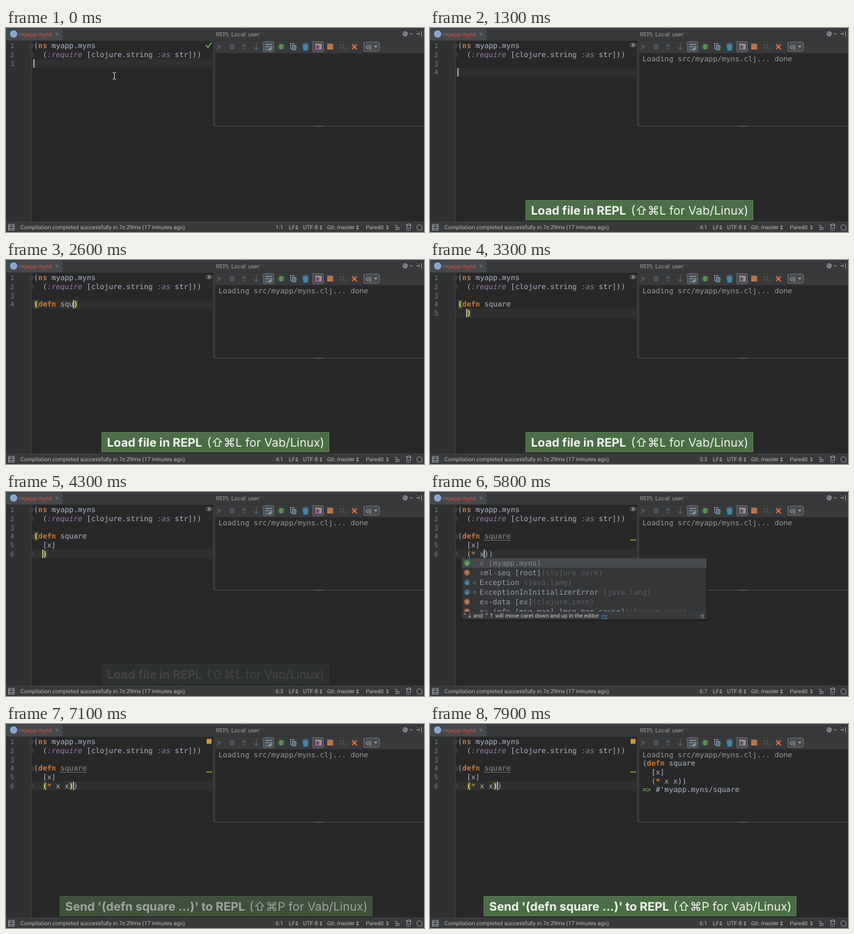
Write an HTML page that moves like this. It is 600x294 px and loops after 8 s.

```html
<!DOCTYPE html>
<html lang="en">
<head>
<meta charset="utf-8">
<title>REPL demo</title>
<style>
  html, body { margin: 0; height: 100%; overflow: hidden; background: #292829; }
  svg { display: block; width: 100vw; height: 100vh; }
  text { white-space: pre; text-rendering: geometricPrecision; }
  .mono { font: 10.5px "DejaVu Sans Mono", monospace; fill: #a9b7c6; }
  .ui { font: 8.15px Roboto, "DejaVu Sans", sans-serif; fill: #bbb; }
  .banner { font: 17px Inter, "DejaVu Sans", sans-serif; fill: #f2f4f1; }
  .keyword { fill: #cc7832; font-weight: bold; }
  .colon { fill: #9876aa; font-style: italic; }
  .unused { fill: #8c8c8c; }
  .bar { fill: #37393b; }
  .line { fill: none; stroke: #8e9194; }
</style>
</head>
<body>
<svg viewBox="0 0 600 294">
  <!-- editor and tab bar -->
  <rect width="600" height="294" fill="#292829"/>
  <rect class="bar" width="600" height="18"/>
  <rect y="1" width="81" height="17" fill="#45494b"/>
  <rect y="18" width="298" height="1" fill="#2f3031"/>
  <circle cx="11" cy="8.5" r="5.2" fill="#8fa9d6"/>
  <text class="ui" x="18.5" y="11.5" style="font-size:8.45px;fill:#c95c4c">myapp.myns</text>
  <path class="line" d="M71 6.5l4 4m0-4l-4 4" stroke-width=".7"/>
  <rect y="19" width="36" height="260" fill="#2e3031"/>
  <path d="M36.5 19V279" stroke="#434547" stroke-width=".7"/>

  <!-- tool window -->
  <rect class="bar" x="297" width="2" height="142"/>
  <rect class="bar" x="299" width="301" height="37"/>
  <path d="M299 17.5H600" stroke="#303234"/>
  <text class="ui" x="301.5" y="11.5" style="font-size:8.4px;fill:#9c9c9c">REPL Local: user</text>
  <g class="line">
    <circle cx="573" cy="8.5" r="2" stroke-width="1.8"/>
    <circle cx="573" cy="8.5" r="3.6" stroke-width="1.3" stroke-dasharray="1.4 1.4"/>
    <path d="M589 8.5h5m-2-2l2 2l-2 2M596.5 4.5v8"/>
  </g>
  <path d="M579.5 7.5h4l-2 2.5z" fill="#8e9194"/>
  <path d="M303.5 22.5l7 4.5l-7 4.5z" fill="#505355"/>
  <circle cx="324.5" cy="27" r="4" fill="#505355"/>
  <path d="M342 32v-9m-3 3.5l3-3.5l3 3.5M359.5 22.5v9m-3-3.5l3 3.5l3-3.5" fill="none" stroke="#55585a" stroke-width="1.5"/>
  <g fill="#484b4d" stroke="#777b7e" stroke-width=".8">
    <rect x="369.5" y="19.5" width="15" height="14.5" rx="1"/>
    <rect x="440.5" y="19.5" width="15" height="14.5" rx="1"/>
    <rect x="513.5" y="20" width="22.5" height="13.5" rx="2"/>
  </g>
  <path d="M372 23.5h10M372 27h9q2 2-1 4h-3m2-2l-2 2l2 1.5M372 31h3" fill="none" stroke="#8fb3cf" stroke-width="1.2"/>
  <ellipse cx="395" cy="27" rx="2.8" ry="4" fill="#57964d"/>
  <path d="M390.5 23l9 8M399.5 23l-9 8M390 27h10" stroke="#57964d"/>
  <g class="line"><rect x="408.5" y="22.5" width="5" height="7"/><rect x="411" y="25" width="5" height="6.5" fill="#47708c"/></g>
  <path d="M426.5 24.5h7l-.7 7.5h-5.6zM425.5 23h9M428.5 22h3" fill="#4585aa" stroke="#4585aa"/>
  <rect x="444" y="22.5" width="9" height="8.5" fill="#a58a9e"/>
  <rect x="445" y="25" width="4.5" height="5" fill="#5a5360"/>
  <rect x="461" y="22.5" width="8.5" height="8.5" fill="#bd7446"/>
  <path class="line" d="M479.5 23.5h5v5h-5zM483 31h5v-4" style="stroke:#505355"/>
  <path d="M497 23.5l6.5 7m0-7l-6.5 7" stroke="#d2703d" stroke-width="1.9"/>
  <text class="ui" x="516.5" y="29.7">clj</text>
  <path d="M528 25.5h5l-2.5 3z" fill="#aaa"/>
  <path d="M299 36.5H600" stroke="#2f3133"/>
  <path d="M299 141.5H600" stroke="#47494b"/>
  <path d="M299.5 37V142" stroke="#3f4143"/>
  <path d="M444 141.5h11" stroke="#888" stroke-dasharray="1.5 1.5"/>

  <g id="live"></g>

  <!-- status bar -->
  <rect class="bar" y="279" width="600" height="15"/>
  <path d="M0 279.5H600" stroke="#404345"/>
  <g class="line"><rect x="3.5" y="283" width="8.5" height="8.5"/><path d="M5.5 283v8M10 283v8M4 285.5h8M4 289h8"/></g>
  <g class="ui">
    <text x="20.5" y="290.4">Compilation completed successfully in 7s 29ms (17 minutes ago)</text>
    <text id="position" x="387" y="290.4"></text>
    <text x="406" y="290.4">LF</text>
    <text x="426.5" y="290.4">UTF-8</text>
    <text x="461" y="290.4">Git: master</text>
    <text x="516.5" y="290.4">Paredit</text>
  </g>
  <path d="M415.5 286.8l2-2.5l2 2.5zm0 1.5h4l-2 2.5zM450 286.8l2-2.5l2 2.5zm0 1.5h4l-2 2.5zM502.5 286.8l2-2.5l2 2.5zm0 1.5h4l-2 2.5zM545.5 286.8l2-2.5l2 2.5zm0 1.5h4l-2 2.5z" fill="#aaa"/>
  <g class="line">
    <path d="M558.5 287v-1.5q0-1.500 1.5-1.5t1.5 1.5v2"/><rect x="560" y="287.5" width="4" height="3"/>
    <path d="M574 284.5h8M575.5 284v-1.5h5v1.5M575.5 285v5l2.5 2l2.5-2v-5M577 288.5h2"/>
    <circle cx="599" cy="287.5" r="4" transform="translate(-5.5)"/><path d="M596 290l2 2"/>
  </g>
</svg>
<script>
const LOOP = 8000, CHAR = 6.321, PITCH = 12.65, LEFT = 40, EDIT_TOP = 29.4, REPL_LEFT = 305, REPL_TOP = 47.6;
const HEADER = "(ns myapp.myns\n  (:require [clojure.string :as str]))\n";
const DEFN = "(defn square\n  [x]\n  (* x x))";
const INSPECTED = 4400;

// [start, interval, keys]; a line break and its indent count as one key
const TYPING = [
  [1200, 110, "\n(defn "], [2200, 140, "square\n  "], [3500, 170, "[x]\n  "],
  [4800, 150, "(* x"], [6000, 200, " x"], [6500, 100, ")"],
];
const POPUPS = [
  { from: 5300, to: 6000, column: 5, hint: "⌃↓ and ⌃↑ will move caret down and up in the editor" },
  { from: 6300, to: 6500, column: 7, hint: "Press ⌃. to choose the selected (or first) suggestion and insert a dot afterwards " },
];
const SUGGESTIONS = [
  ["x", " (myapp.myns)", "#4f8a4b", "s"],
  ["xml-seq [root]", "(clojure.core)", "#a5623f", "f"],
  ["Exception", " (java.lang)", "#356683", "c"],
  ["ExceptionInInitializerError", " (java.lang)", "#356683", "c"],
  ["ex-data [ex]", "(clojure.core)", "#a5623f", "f"],
  ["ex-info [msg map] [msg map cause]", "(clojure.core)", "#a5623f", "f"],
];
const ICONS = {
  check: `<path d="M287 24.5l3 3.5l5-7" fill="none" stroke="#5f9c4e" stroke-width="2"/>`,
  eye: `<ellipse cx="291.5" cy="24.5" rx="4" ry="2.6" class="line"/><circle cx="291.5" cy="24.5" r="1.4" fill="#aaa"/>`,
  pause: `<path d="M290 22v6M293 22v6" stroke="#888" stroke-width="1.3"/>`,
  warning: `<rect x="288" y="21.5" width="7" height="7" fill="#d09a2c"/>`,
};
const ICON_TIMES = [[0, "check"], [1200, "eye"], [INSPECTED, "warning"], [4800, "eye"], [6300, "pause"], [6500, "eye"], [6800, "warning"]];

const ramp = (t, from, to) => Math.min(1, Math.max(0, (t - from) / (to - from)));
const rect = (x, y, w, h, fill, more = "") => `<rect x="${x}" y="${y}" width="${w}" height="${h}" fill="${fill}" ${more}/>`;
const text = (x, y, kind, body, more = "") => `<text x="${x}" y="${y}" class="${kind}" ${more}>${body}</text>`;
const rowY = row => EDIT_TOP + row * PITCH;

const colorize = code => code
  .replace(/\((ns|defn?|\*)(?![\w-])/g, '(<tspan class="keyword">$1</tspan>')
  .replace(/(^|[ (])(:\w+)/g, '$1<tspan class="colon">$2</tspan>');
const codeBlock = (code, x, y) => code.split("\n")
  .map((line, row) => text(x, y + row * PITCH, "mono", colorize(line))).join("");

function typedAt(t) {
  return TYPING.map(([start, interval, keys]) =>
    keys.match(/\n *|[^\n]/g).slice(0, Math.max(0, Math.floor((t - start) / interval) + 1)).join("")).join("");
}

function openBrackets(code) {
  const open = [];
  [...code].forEach((c, i) => {
    if ("([".includes(c)) open.push(i);
    if (")]".includes(c)) open.pop();
  });
  return open;
}

function place(code, index) {
  const lines = code.slice(0, index).split("\n");
  return { row: lines.length - 1, column: lines.at(-1).length };
}

function bracketMark(code, index) {
  const { row, column } = place(code, index), x = LEFT + column * CHAR, y = rowY(row);
  return rect(x, y - 9.5, CHAR, 12, "#3b4a46") +
    text(x, y, "mono", code[index], 'style="fill:#ffef28;font-weight:bold"');
}

function drawEditor(t, completing) {
  const before = HEADER + typedAt(t), open = openBrackets(before);
  const code = before + open.map(i => before[i] === "(" ? ")" : "]").reverse().join("");
  const caret = place(code, before.length), lines = code.split("\n");
  let out = rect(37, rowY(caret.row) - 9.7, 260, PITCH, "#2f2f2f");
  lines.forEach((_, row) => out += text(6, rowY(row), "mono", row + 1, 'style="font-size:9.5px;fill:#7d8184"'));
  const folds = t >= 3900 ? [0, 1, 3, 5] : [0, 1];
  for (const row of folds.filter(r => r < lines.length))
    out += `<path d="M34.5 ${rowY(row) - 6}h4.5v5h-4.5zm1 2.5h2.5" fill="#292829" stroke="#55585a" stroke-width=".7"/>`;
  const block = codeBlock(code, LEFT, EDIT_TOP);
  out += t < INSPECTED ? block : block.replace("square", '<tspan class="unused">square</tspan>');

  const closing = before.endsWith(")") ? before.length - 1 : before.length;
  if (!completing && code[closing] === ")")
    out += bracketMark(code, openBrackets(code.slice(0, closing)).at(-1)) + bracketMark(code, closing);
  if (t >= INSPECTED)
    out += rect(LEFT + 6 * CHAR, rowY(3) + 1.8, 6 * CHAR, .8, "#77797c") + rect(287, 68.5, 9, 1.4, "#b0903c");
  out += rect(LEFT + caret.column * CHAR - .6, rowY(caret.row) - 9.5, 1.4, 12, "#d0d0d0");
  out += ICONS[ICON_TIMES.findLast(([start]) => t >= start)[1]];
  if (t < 1200)
    out += `<path d="M153 64q2.5 0 2.5 2v6q0 2-2.5 2M158 64q-2.5 0-2.5 2m0 6q0 2 2.5 2" fill="none" stroke="#ccc"/>`;
  // the status field lags at the start and has room for three characters
  const position = t < 100 ? "1:1" : `${caret.row + 1}:${caret.column + 1}`.slice(0, 3);
  return { out, position };
}

function drawRepl(t) {
  let out = "";
  if (t >= 700)
    out += text(REPL_LEFT, REPL_TOP, "mono", "Loading src/myapp/myns.clj..." + (t >= 900 ? " done" : ""), 'style="fill:#999"');
  if (t >= 7200) out += codeBlock(DEFN, REPL_LEFT, REPL_TOP + PITCH);
  if (t >= 7400)
    out += text(REPL_LEFT, REPL_TOP + 4 * PITCH, "mono", `<tspan fill="#629755" font-weight="bold">=&gt;</tspan> #'myapp.myns/square`);
  return out;
}

function drawPopup({ column, hint }) {
  const x = LEFT + column * CHAR - 26, width = 351.5, height = 88;
  let out = rect(-1, 0, width + 2, height + 2, "#1c1c1d") + rect(0, 0, width, height, "#343638") + rect(0, 0, width, 13.5, "#46494b");
  SUGGESTIONS.forEach(([name, tail, color, letter], i) => {
    const y = 6.7 + i * 14;
    out += `<circle cx="7.5" cy="${y}" r="4.2" fill="${color}"/>` +
      text(7.5, y + 2.3, "ui", letter, 'text-anchor="middle" style="font-size:6.5px;fill:#ccc"');
    if (letter === "c") out += `<path d="M17 ${y}v-1.5h2.5v1.500M16.5 ${y}h3.5v2h-3.5z" fill="none" stroke="#4f7747" stroke-width=".8"/>`;
    out += text(25.5, y + 3.7, "mono",
      name.replace("x", '<tspan fill="#94739f">x</tspan>') + `<tspan fill="${i ? "#5c5f61" : "#858789"}">${tail}</tspan>`,
      'style="fill:#9a9fa5"');
  });
  out += rect(0, 77, width, height - 77, "#37393b") +
    text(1, 85.4, "ui", `${hint}  <tspan fill="#589df6" text-decoration="underline">&gt;&gt;</tspan>`, 'style="font-size:8.2px;fill:#ccc"') +
    text(342.5, 86, "ui", "π", 'style="font-size:10px;fill:#589df6"');
  return `<g transform="translate(${x} 95.5)">${out}</g>`;
}

function drawBanner(left, right, action, key, opacity) {
  if (!opacity) return "";
  return `<g opacity="${opacity}">` +
    rect(left + .5, 248.5, right - left - 1, 28, "#4b6d47", 'stroke="#5d7d57"') +
    text(left + 8, 269, "banner", action, 'style="font-weight:bold"') +
    text(right - 7, 269, "banner", `(⇧⌘${key} for Vab/Linux)`, 'text-anchor="end"') + "</g>";
}

const live = document.getElementById("live"), positionField = document.getElementById("position");
let shown = "";

function render(t) {
  const popup = POPUPS.find(p => t >= p.from && t < p.to);
  const { out, position } = drawEditor(t, popup);
  positionField.textContent = position;
  const picture = out + drawRepl(t) + (popup ? drawPopup(popup) : "") +
    drawBanner(137, 464, "Load file in REPL", "L", ramp(t, 300, 800) * (1 - ramp(t, 3850, 4370))) +
    drawBanner(77, 526, "Send '(defn square ...)' to REPL", "P", ramp(t, 6800, 7300));
  if (picture !== shown) live.innerHTML = shown = picture;
}

function tick() {
  render(performance.now() % LOOP);
  requestAnimationFrame(tick);
}
tick();
</script>
</body>
</html>
```
